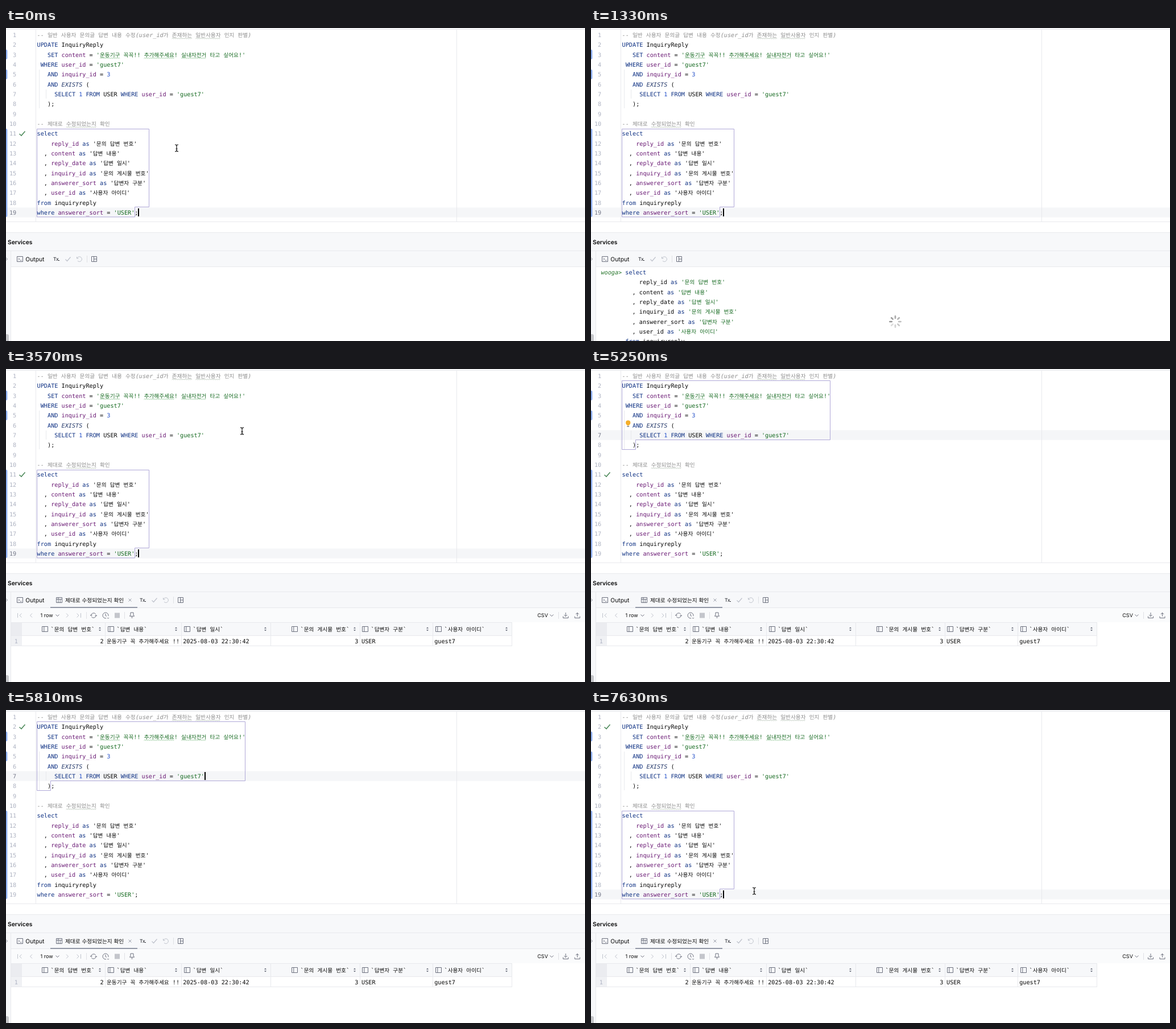
An HTML page with a canvas for the animation above (8000 ms loop, 1018 by 550 pixels).

```html
<!DOCTYPE html>
<html lang="ko">
<head>
<meta charset="utf-8">
<title>SQL console</title>
<style>
  html, body { margin: 0; width: 100%; height: 100%; overflow: hidden; background: #fff; }
  canvas { display: block; width: 1018px; height: 550px; text-rendering: geometricPrecision; }
</style>
</head>
<body>
<canvas id="stage" width="1018" height="550"></canvas>
<script>
const LOOP = 8000, WIDTH = 1018, HEIGHT = 550;
const LINE = 17.33, CODE_X = 54.6;
const ctx = document.getElementById('stage').getContext('2d');

const INK = '#080808', KEYWORD = '#0c2f82', STRING = '#14691f', NUMBER = '#2450c8',
      COLUMN = '#6a1a74', COMMENT = '#8c8c8c', ICON = '#6c707e', FAINT = '#bfc3cc',
      PANEL = '#f7f8fa', BORDER = '#e8e9ed';

const face = (latin, size, weight = 400, hangulWeight = 400) => ({
  latin: `${weight} ${size}px ${latin}`,
  hangul: `${hangulWeight} 9.63px "Noto Sans CJK KR", sans-serif`
});
const MONO = face('"DejaVu Sans Mono", monospace', 10.2, 400, 500);
const MONO_ITALIC = face('"DejaVu Sans Mono", monospace', 10.2, 'italic 400');
const UI = face('Inter, sans-serif', 10.3);
const UI_BOLD = face('Inter, sans-serif', 10.3, 600);
const UI_SMALL = face('Inter, sans-serif', 9);
const TINY = face('Inter, sans-serif', 8.5, 500);

const SELECT_LINES = [
  'select',
  "    reply_id as '문의 답변 번호'",
  "  , content as '답변 내용'",
  "  , reply_date as '답변 일시'",
  "  , inquiry_id as '문의 게시물 번호'",
  "  , answerer_sort as '답변자 구분'",
  "  , user_id as '사용자 아이디'",
  'from inquiryreply',
  "where answerer_sort = 'USER';"
];
const EDITOR_LINES = [
  '-- 일반 사용자 문의글 답변 내용 수정(user_id가 존재하는 일반사용자 인지 판별)',
  'UPDATE InquiryReply',
  "   SET content = '운동기구 꼭꼭!! 추가해주세요! 실내자전거 타고 싶어요!'",
  " WHERE user_id = 'guest7'",
  '   AND inquiry_id = 3',
  '   AND EXISTS (',
  "     SELECT 1 FROM USER WHERE user_id = 'guest7'",
  '   );',
  '',
  '-- 제대로 수정되었는지 확인',
  ...SELECT_LINES
];
const TYPOS = ['존재하는', '일반사용자', '수정되었는지', '운동기구', '추가해주세요', '실내자전거'];
const KEYWORDS = /^(update|set|where|and|select|from|as)$/i;

// Statement outlines: top, right, bottom of the full block, then right end and bottom of its last line.
const UPDATE_BLOCK = { top: 20.5, right: 420.5, mid: 124.5, lastRight: 78.5, bottom: 141.5 };
const SELECT_BLOCK = { top: 177.5, right: 251.5, mid: 314.5, lastRight: 226.5, bottom: 332 };

const SELECT_POPUP = { x: 232, y: 332, rows: [
  "select reply_id as '문의 답변 번호' , content as '답변 내용'...",
  EDITOR_LINES[0] + ' ...'
] };
const UPDATE_POPUP = { x: 350, y: 125, rows: [
  "UPDATE InquiryReply SET content = '운동기구 꼭꼭!! 추가해주세요!...",
  "SELECT 1 FROM USER WHERE user_id = 'guest7'",
  EDITOR_LINES[0] + ' ...'
] };

const CARET_ON = [[0, 560], [1260, 1820], [2380, 2940], [3500, 5040], [5740, 6370], [6930, LOOP]];
const RUNNING = [[1260, 1470], [5740, 5810]];
// Pointer runs: [time, x, y]
const POINTER = [
  [[0, 300, 211], [770, 300, 211]],
  [[2730, 312, 196], [3010, 420, 80], [3150, 470, 45], [3360, 432, 90], [3500, 415, 109],
   [3570, 415, 109], [3710, 424, 104], [3850, 420, 113], [5250, 420, 113]],
  [[6370, 398, 120], [6580, 366, 205], [6790, 312, 290], [7000, 287, 318], [LOOP, 287, 318]]
];

const within = (t, from, to) => t >= from && t < to;
const withinAny = (t, spans) => spans.some(([from, to]) => within(t, from, to));
const baseline = line => 16 + LINE * (line - 1);

function box(x, y, w, h, color) {
  ctx.fillStyle = color;
  ctx.fillRect(x, y, w, h);
}

function roundBox(x, y, w, h, radius, color) {
  ctx.fillStyle = color;
  ctx.beginPath();
  ctx.roundRect(x, y, w, h, radius);
  ctx.fill();
}

function stroke(path, color = ICON, width = 1) {
  ctx.strokeStyle = color;
  ctx.lineWidth = width;
  ctx.stroke(new Path2D(path));
}

function iconAt(x, y, path, color, width) {
  ctx.save();
  ctx.translate(x, y);
  stroke(path, color, width);
  ctx.restore();
}

function wave(x, y, width, color) {
  let path = `M${x} ${y}`;
  for (let i = 1; i * 1.6 <= width; i++) path += `L${x + i * 1.6} ${y - (i % 2) * 1.4}`;
  stroke(path, color, 0.7);
}

// Latin and Hangul runs use separate fonts; returns the x after the text.
function write(text, x, y, color = INK, font = UI, markTypos = false) {
  ctx.fillStyle = color;
  for (const run of text.match(/[가-힣]+|[^가-힣]+/g) || []) {
    ctx.font = /[가-힣]/.test(run) ? font.hangul : font.latin;
    ctx.fillText(run, x, y);
    const width = ctx.measureText(run).width;
    if (markTypos && TYPOS.includes(run)) wave(x, y + 3, width, color === COMMENT ? '#a5b5a5' : '#75b87c');
    x += width;
  }
  return x;
}

function writeRight(text, right, y, color) {
  ctx.textAlign = 'right';
  write(text, right, y, color, MONO);
  ctx.textAlign = 'left';
}

function writeCode(line, x, y, inEditor) {
  if (line.startsWith('--')) return write(line, x, y, COMMENT, MONO_ITALIC, true);
  let previous = '';
  for (const token of line.match(/'[^']*'|\w+|\s+|./g) || []) {
    let color = INK, font = MONO;
    if (token[0] === "'") color = inEditor && previous === 'as' ? INK : STRING;
    else if (KEYWORDS.test(token)) color = KEYWORD;
    else if (/^\d+$/.test(token)) color = NUMBER;
    else if (token === 'EXISTS') { color = '#263a6b'; font = MONO_ITALIC; }
    else if (inEditor && /_|^content$/.test(token)) color = COLUMN;
    x = write(token, x, y, color, font, inEditor);
    if (token.trim()) previous = token;
  }
}

function drawEditor(t, block, popup) {
  const currentLine = within(t, 3780, 7210) ? 7 : 19;
  box(0, 0, WIDTH, 2, PANEL);
  box(0, 2, WIDTH, 1, BORDER);
  box(0, currentLine === 7 ? 107.5 : 315.5, WIDTH, 17.2, '#f5f6f8');
  if (popup) {
    box(54, block.top - 0.5, WIDTH - 54, block.mid - block.top + 0.5, '#cbcaff');
    box(54, block.mid, block.lastRight - 54, block.bottom - block.mid + 0.5, '#cbcaff');
  }
  box(52, 3, 1, 338, BORDER);
  box(792, 3, 1, 338, popup ? 'rgba(232,233,237,.5)' : BORDER);
  box(58, 73, 1, 68, BORDER);
  box(70, 108, 1, 16, BORDER);
  box(0, 340, WIDTH, 1, BORDER);
  for (const [from, to] of [[38, 55], [73, 90], [177, 332]]) roundBox(-2, from, 4.4, to - from, 2, '#8fb0f2');

  stroke(`M54.5 ${block.top}H${block.right}V${block.mid}H${block.lastRight}V${block.bottom}H54.5Z`,
    popup ? '#bdb8ee' : '#b0a9d8');

  EDITOR_LINES.forEach((line, i) => {
    writeRight(String(i + 1), 18.2, baseline(i + 1), i + 1 === currentLine ? '#767a8a' : '#aeb3c2');
    writeCode(line, CODE_X, baseline(i + 1), true);
  });
  if (!withinAny(t, RUNNING)) {
    iconAt(28.5, t < 5740 ? 185.5 : 29.5, 'M-5 .5L-1.5 3.5L5 -4', '#4f8b5c', 1.6);
  }

  if (within(t, 4620, 5320) || within(t, 6510, 7210)) {
    ctx.fillStyle = '#f5ae2b';
    ctx.beginPath();
    ctx.arc(65.2, 94.4, 4.1, 0, Math.PI * 2);
    ctx.fill();
    box(63.3, 96, 3.8, 3.2, '#f5ae2b');
    box(63.3, 100, 3.8, 1.6, '#7d808a');
  }
  if (withinAny(t, CARET_ON)) {
    if (currentLine === 7) box(349, 109, 2, 14, '#000');
    else box(232, 317, 2, 14, '#000');
  }
}

function drawTableIcon(x, y) {
  iconAt(x, y, 'M-5 -4.5H5V4.5H-5ZM-5 -1.5H5M-1.7 -4.5V4.5M1.7 -1.5V4.5');
}

function drawTabs(hasResult) {
  box(0, 359, WIDTH, 61, PANEL);
  box(0, 359, WIDTH, 1, BORDER);
  box(0, 391, WIDTH, 1, BORDER);
  box(0, 419, WIDTH, 1, BORDER);
  box(0, 392, 8, 158, PANEL);
  box(8, 392, 1, 158, BORDER);
  write('Services', 3, 380, INK, UI_BOLD);
  stroke('M0 403.5L2.5 406L0 408.5', '#8d919c');
  roundBox(-3, 538, 8, 16, 3, '#c6c7ca');

  iconAt(24.5, 406, 'M-5 -4.5H5V4.5H-5ZM-2.8 -2L-.8 0L-2.8 2M.3 2.2H3');
  write('Output', 34.3, 409.7);
  ctx.save();
  if (hasResult) {
    drawTableIcon(93.5, 406);
    write('제대로 수정되었는지 확인', 104, 409.7);
    iconAt(218, 406, 'M-2.5 -2.5L2.5 2.5M2.5 -2.5L-2.5 2.5', '#9a9eaa');
    box(78, 418, 153, 2, '#9298a6');
    ctx.translate(152, 0);
  }
  write('Tx', 83, 409, '#33353b', TINY);
  iconAt(93, 408.5, 'M-1 -.5L0 .5L1 -.5', '#33353b');
  iconAt(109, 406, 'M-4.5 .5L-1.5 3.5L4.5 -3.5', FAINT, 1.2);
  iconAt(129, 406, 'M-4.5 -4V-1H-1.5M-4 -1.2A4.3 4.3 0 1 1 -3 3.2', FAINT);
  box(142, 400, 1, 12, '#dfe1e5');
  iconAt(155, 406, 'M-4.5 -4.5H4.5V4.5H-4.5ZM-.5 -4.5V4.5M-.5 0H4.5');
  ctx.restore();
}

function drawOutput() {
  const x = write('wooga> ', 17.4, 433, '#26752b', MONO_ITALIC);
  SELECT_LINES.slice(0, 8).forEach((line, i) => writeCode(line, x, 433 + LINE * i, false));
}

function drawToolbar() {
  box(9, 420, WIDTH - 9, 25, '#fafbfc');
  iconAt(24, 433, 'M-3.5 -4V4M3.5 -3.5L0 0L3.5 3.5', FAINT);
  iconAt(44, 433, 'M2 -3.5L-1.5 0L2 3.5', FAINT);
  write('1 row', 60.5, 436.3, INK, UI_SMALL);
  iconAt(90.5, 433, 'M-3 -1.5L0 1.5L3 -1.5');
  iconAt(108, 433, 'M-2 -3.5L1.5 0L-2 3.5', FAINT);
  iconAt(128, 433, 'M3.5 -4V4M-3.5 -3.5L0 0L-3.5 3.5', FAINT);
  iconAt(154, 433, 'M-4.3 .5A4.4 4.4 0 0 1 3.7 -2.3M4.3 -.5A4.4 4.4 0 0 1 -3.7 2.3M-6 -1L-4.3 .8L-2.6 -1M6 1L4.3 -.8L2.6 1');
  iconAt(175, 433, 'M4.9 1.2A5 5 0 1 0 1.2 4.9M0 -3V.3L2 1.5M3 4L4.5 5.5L6 4');
  box(191, 428.5, 9, 9, '#c3c5cb');
  iconAt(221.5, 433, 'M-2.5 -5H2.5V-1L4 1.3H-4L-2.5 -1ZM0 1.3V5');
  for (const x of [141, 208, 971]) box(x, 427, 1, 12, '#dfe1e5');
  write('CSV', 934.3, 436.3, INK, UI_SMALL);
  iconAt(959.5, 433, 'M-3 -1.5L0 1.5L3 -1.5');
  iconAt(984, 433, 'M-4.5 1.5V4.5H4.5V1.5M0 -5V1.5M-2.7 -1L0 1.7L2.7 -1');
  iconAt(1004.5, 433, 'M-4.5 1.5V4.5H4.5V1.5M0 1.7V-4.7M-2.7 -2L0 -4.7L2.7 -2');
}

function drawResult() {
  drawToolbar();
  box(9, 445, 880, 23, PANEL);
  box(9, 445, 19, 23, '#ebecf0');
  box(9, 469, 19, 17, '#f0f1f4');
  for (const y of [445, 468, 486]) box(9, y, 880, 1, BORDER);
  // Header icon x, title, right edge of the column
  const columns = [
    [68.5, '문의 답변 번호', 174], [184.5, '답변 내용', 308], [318.5, '답변 일시', 465],
    [507.5, '문의 게시물 번호', 622], [631.5, '답변자 구분', 750], [760.5, '사용자 아이디', 889]
  ];
  for (const [x, title, right] of columns) {
    iconAt(x, 457, 'M-5 -4.5H5V4.5H-5ZM-1.7 -4.5V4.5');
    write('`' + title + '`', x + 10, 460.7, INK, MONO);
    ctx.fillStyle = ICON;
    ctx.fill(new Path2D(`M${right - 11} 456l2 -2.5l2 2.5zM${right - 11} 458l2 2.5l2 -2.5z`));
    box(right, 445, 1, 42, BORDER);
  }
  writeRight('1', 21, 481.5, '#aeb3c2');
  writeRight('2', 171.7, 481.5, INK);
  write('운동기구 꼭 추가해주세요 !!', 177, 481.5, INK, MONO);
  write('2025-08-03 22:30:42', 311.2, 481.5, INK, MONO);
  writeRight('3', 619.3, 481.5, INK);
  write('USER', 625, 481.5, INK, MONO);
  write('guest7', 753.2, 481.5, INK, MONO);
}

function drawSpinner(x, y, t) {
  const turn = Math.floor(t / 140);
  ctx.save();
  ctx.translate(x, y);
  ctx.lineCap = 'round';
  for (let i = 0; i < 8; i++) {
    const shade = 150 + 10 * ((i + 11 - turn % 8) % 8);
    stroke('M0 -6.2V-9.6', `rgb(${shade},${shade},${shade})`, 2.7);
    ctx.rotate(Math.PI / 4);
  }
  ctx.restore();
}

function drawPopup({ x, y, rows }) {
  const width = 342, height = 51.4 + 19.3 * rows.length;
  ctx.save();
  ctx.shadowColor = 'rgba(0,0,0,.3)';
  ctx.shadowBlur = 11;
  ctx.shadowOffsetY = 2;
  roundBox(x, y, width, height, 6, '#fff');
  ctx.shadowColor = 'transparent';
  ctx.strokeStyle = '#b9bdc9';
  ctx.lineWidth = 1;
  ctx.stroke();
  ctx.clip();
  box(x, y + 31, width, 19.3, '#d3dff5');
  box(x, y + height - 16, width, 16, PANEL);
  ctx.textAlign = 'center';
  write('Statements', x + 172, y + 20.5, INK, UI_BOLD);
  ctx.textAlign = 'left';
  rows.forEach((row, i) => write(row, x + 1.3, y + 44.5 + 19.3 * i));
  write('Customize', x + 2.8, y + height - 4, '#315fa8');
  ctx.restore();
}

function drawPointer(t) {
  const run = POINTER.find(points => within(t, points[0][0], points.at(-1)[0]));
  if (!run) return;
  const next = run.findIndex(point => point[0] > t);
  const [t0, x0, y0] = run[next - 1], [t1, x1, y1] = run[next];
  const k = (t - t0) / (t1 - t0);
  const shape = 'M-3 -6Q0 -6 0 -4Q0 -6 3 -6M0 -4.5V4.5M-3 6Q0 6 0 4Q0 6 3 6M-1.5 1.5H1.5';
  const x = x0 + (x1 - x0) * k, y = y0 + (y1 - y0) * k;
  iconAt(x, y, shape, '#fff', 2.6);
  iconAt(x, y, shape, '#111', 1.2);
}

function draw(t) {
  const block = within(t, 4130, 7630) ? UPDATE_BLOCK : SELECT_BLOCK;
  const popup = within(t, 770, 1260) ? SELECT_POPUP : within(t, 5320, 5740) ? UPDATE_POPUP : null;
  const hasResult = t >= 1470;
  ctx.textRendering = 'geometricPrecision';
  box(0, 0, WIDTH, HEIGHT, '#fff');
  drawEditor(t, block, popup);
  drawTabs(hasResult);
  if (hasResult) drawResult();
  else if (t >= 1260) drawOutput();
  if (within(t, 1330, 1470)) drawSpinner(535, 516, t);
  if (within(t, 1540, 1890)) drawSpinner(548, 516, t);
  if (popup) drawPopup(popup);
  drawPointer(t);
}

const start = performance.now();
function tick() {
  draw((performance.now() - start) % LOOP);
  requestAnimationFrame(tick);
}
tick();
</script>
</body>
</html>
```
